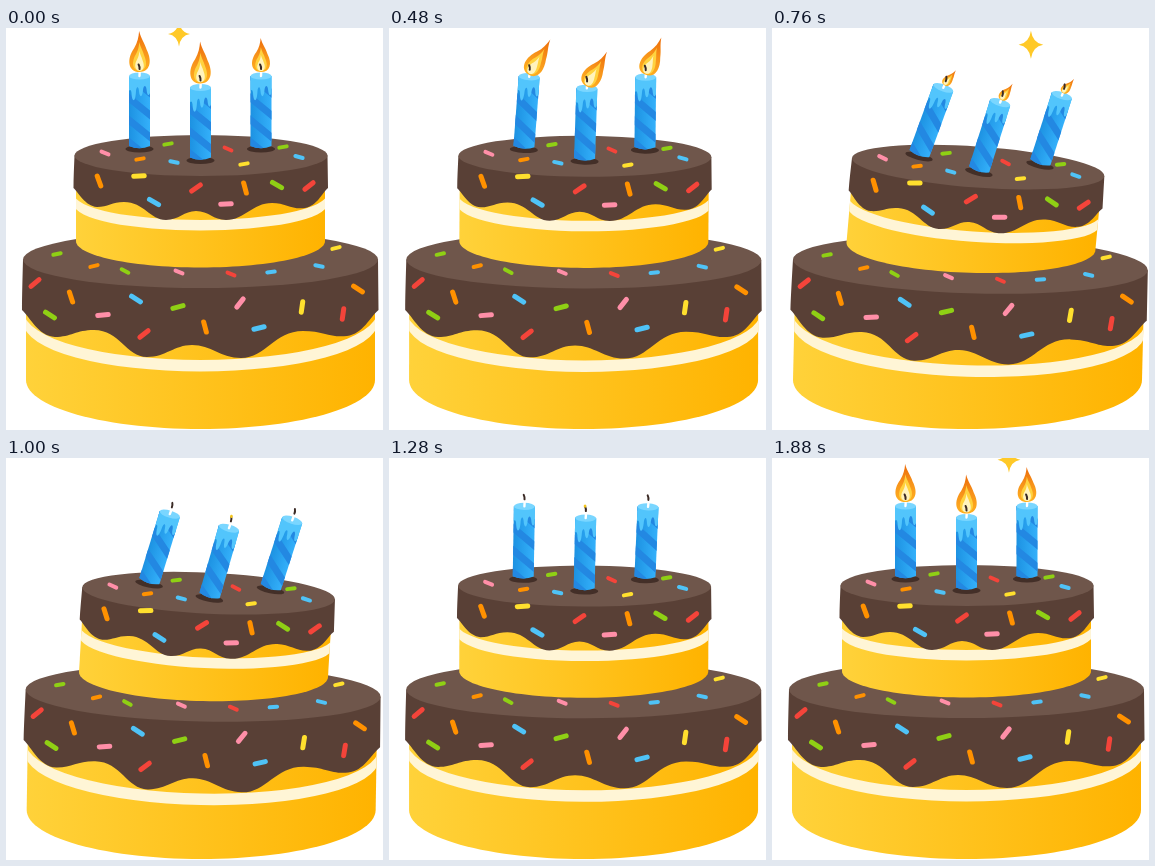
Write an HTML page with a canvas that moves like this. It is 377 px wide and 402 px high and loops after 1.92 s.

```html
<!DOCTYPE html>
<html lang="en">
<head>
<meta charset="utf-8">
<title>Birthday cake</title>
<style>
  html, body { margin: 0; width: 100%; height: 100%; overflow: hidden; background: #fff; }
  canvas { display: block; width: 377px; height: 402px; }
</style>
</head>
<body>
<canvas id="stage"></canvas>
<script>
const W = 377, H = 402, LOOP = 1920, STEP = 40;
const canvas = document.getElementById('stage');
const ctx = canvas.getContext('2d');
const dpr = window.devicePixelRatio || 1;
canvas.width = W * dpr;
canvas.height = H * dpr;

const RAD = Math.PI / 180;
const C = {
  side: '#594036', face: '#6f564b', cream: '#fff5d6', shade: '#432f28',
  p: '#ff8fa8', o: '#ff9100', g: '#8fd014', b: '#4fc3f7', r: '#f4443a', y: '#ffe02e'
};

// Sprinkles: x, y, angle, colour
const lower = {
  cx: 194.5, rx: 174.5, pivot: [22, 362], lean: 1.75,
  face: [194.5, 231.5, 177.5, 28.5],
  bottom: [352, 49], stripe: [284, 48, 11.5],
  icing: new Path2D('M17 231.5 C16.5 250 16 268 16 282 C24 289 32 308 49 309 C65 309 70 302 88 302 ' +
    'C114 302 120 329 141 329 C160 329 168 317 186 317 C205 317 215 330 235 330 ' +
    'C260 330 268 303 297 303 C318 303 324 310 341 308 C357 306 364 289 372.5 282 L372 231.5 Z'),
  flat: [[51,226,-12,'g'], [88,238,-14,'o'], [119,243,28,'g'], [173,244,22,'p'],
    [225,246,22,'r'], [265,244,-6,'b'], [313,238,12,'b'], [330,220,-14,'y']],
  front: [[29,255,-40,'r'], [65,269,72,'o'], [44,287,32,'g'], [97,287,-5,'p'], [130,271,32,'b'],
    [138,306,-38,'r'], [172,279,-15,'g'], [199,299,75,'o'], [234,275,-52,'p'],
    [253,300,-14,'b'], [296,279,-82,'y'], [337,286,-82,'r'], [352,261,33,'o']]
};
const upper = {
  cx: 194.5, rx: 124.5, pivot: [38, 290], lean: 4.1,
  face: [195, 127.5, 126.5, 20.5],
  bottom: [213, 26.5], stripe: [166, 26, 10.5],
  icing: new Path2D('M68.5 127.5 C68 140 67.5 150 67.5 160 C73 165 79 178 91 179 C102 179 106 174 118 174 ' +
    'C138 174 144 192 160 192 C173 192 178 183 190 183 C203 183 207 192 220 192 ' +
    'C239 192 246 175 266 175 C280 175 286 182 299 180 C311 178 316 165 322 160 L321.5 127.5 Z'),
  flat: [[99,125,22,'p'], [134,131,-10,'o'], [162,116,-10,'g'], [168,134,12,'b'],
    [222,121,24,'r'], [238,136,-10,'y'], [277,119,-10,'g'], [293,129,15,'b']],
  front: [[93,153,70,'o'], [133,148,-4,'y'], [148,174,30,'b'], [190,160,-35,'r'],
    [220,176,-4,'p'], [239,160,75,'o'], [271,157,30,'g'], [303,158,-38,'r']]
};

// swing: lean start, lean end, return start, return end, degrees
// size and tilt: flame length and direction as [ms, value]
const candles = [
  { x: 133.5, y: 119, swing: [360, 760, 890, 1340, 20],
    size: [[0,41], [160,38], [320,42], [600,41], [760,19], [860,0], [1380,0], [1600,36], [1740,42], [1880,38], [1920,41]],
    tilt: [[0,0], [380,0], [580,65], [620,65], [780,38], [1200,0]] },
  { x: 194.5, y: 130.5, swing: [400, 800, 910, 1350, 18], ember: true,
    size: [[0,42], [160,38], [320,33], [600,45], [760,20], [880,0], [1420,0], [1640,37], [1760,35], [1880,39], [1920,42]],
    tilt: [[0,0], [380,0], [580,64], [620,64], [780,36], [1200,0]] },
  { x: 255, y: 119, swing: [440, 840, 900, 1390, 20],
    size: [[0,34], [160,39], [320,46], [600,37], [760,18], [860,0], [1400,0], [1620,38], [1740,41], [1880,35], [1920,34]],
    tilt: [[0,0], [400,0], [580,58], [620,58], [780,40], [1200,0]] }
];

// Stars: from, to, x, y at start, x drift, y drift per second, radius by time
const stars = [
  { from: 0, to: 440, x: 173, y: 6, vx: 16, vy: 97, r: [[0,12.5], [320,11.5], [440,0]] },
  { from: 640, to: 920, x: 257.5, y: 6, vx: 12, vy: 90, r: [[640,2], [760,14], [840,9], [920,0]] },
  { from: 1740, to: 1920, x: 235, y: -13, vx: 14, vy: 105, r: [[1740,13], [1920,13]] }
];

function ease(t, a, b) {
  const u = Math.min(1, Math.max(0, (t - a) / (b - a)));
  return u * u * (3 - 2 * u);
}

function along(keys, t) {
  for (let i = 1; i < keys.length; i++) {
    const [t0, v0] = keys[i - 1], [t1, v1] = keys[i];
    if (t <= t1) return v0 + (v1 - v0) * ease(t, t0, t1);
  }
  return keys[keys.length - 1][1];
}

function turn([px, py], deg, x, y) {
  const c = Math.cos(deg * RAD), s = Math.sin(deg * RAD);
  return [px + (x - px) * c - (y - py) * s, py + (x - px) * s + (y - py) * c];
}

function inFrame(x, y, deg, draw) {
  ctx.save();
  ctx.translate(x, y);
  ctx.rotate(deg * RAD);
  draw();
  ctx.restore();
}

function oval(x, y, rx, ry, fill) {
  ctx.beginPath();
  ctx.ellipse(x, y, rx, ry, 0, 0, 2 * Math.PI);
  ctx.fillStyle = fill;
  ctx.fill();
}

function sprinkle([x, y, deg, hue], len, width) {
  inFrame(x, y, deg, () => {
    ctx.beginPath();
    ctx.moveTo(-len / 2, 0);
    ctx.lineTo(len / 2, 0);
    ctx.lineWidth = width;
    ctx.lineCap = 'round';
    ctx.strokeStyle = C[hue];
    ctx.stroke();
  });
}

// The sponge joins a leaning top edge to the edge it stands on.
function tier(part, amount, foot) {
  const { cx, rx, pivot, face, bottom, stripe } = part;
  const deg = part.lean * amount;
  const top = face[1] + 22;
  const body = new Path2D();
  body.moveTo(...turn(pivot, deg, cx + rx, top));
  for (let i = 0; i <= 60; i++) {
    const a = Math.PI * i / 60;
    body.lineTo(...foot(cx + rx * Math.cos(a), bottom[0] + bottom[1] * Math.sin(a)));
  }
  body.lineTo(...turn(pivot, deg, cx - rx, top));
  body.closePath();

  const gold = ctx.createLinearGradient(cx - rx, 0, cx + rx, 0);
  gold.addColorStop(0, '#ffd23a');
  gold.addColorStop(1, '#ffb300');
  ctx.fillStyle = gold;
  ctx.fill(body);

  ctx.save();
  ctx.clip(body);
  ctx.translate(...pivot);
  ctx.rotate(deg * RAD);
  ctx.translate(-pivot[0], -pivot[1]);
  const [sy, sr, thick] = stripe;
  ctx.beginPath();
  ctx.ellipse(cx, sy, rx + 2, sr, 0, 0, Math.PI);
  ctx.ellipse(cx, sy + thick, rx + 2, sr, 0, Math.PI, 0, true);
  ctx.closePath();
  ctx.fillStyle = C.cream;
  ctx.fill();
  ctx.restore();

  inFrame(...pivot, deg, () => {
    ctx.translate(-pivot[0], -pivot[1]);
    ctx.fillStyle = C.side;
    ctx.fill(part.icing);
    oval(...face, C.face);
    part.flat.forEach(s => sprinkle(s, 7.5, 4));
    part.front.forEach(s => sprinkle(s, 10.5, 5));
  });
}

const wax = new Path2D('M-10.5 -71 L10.5 -71 L10.5 -54 C9 -50 7.5 -52 7 -58 C6 -63 4 -61 3.5 -57 ' +
  'C3 -49 0 -49 -.5 -56 C-1 -61 -3 -61 -3.5 -56 C-4 -44 -7.5 -44 -8 -54 C-8.5 -58 -10 -57 -10.5 -56 Z');

function candleBody() {
  const shape = new Path2D('M-10.5 -71 L10.5 -71 L10.5 -1 Q0 3.5 -10.5 -1 Z');
  const blue = ctx.createLinearGradient(-10.5, 0, 10.5, 0);
  blue.addColorStop(0, '#1d92e2');
  blue.addColorStop(1, '#34b0fa');
  ctx.fillStyle = blue;
  ctx.fill(shape);
  ctx.save();
  ctx.clip(shape);
  ctx.fillStyle = '#2388e2';
  for (let y = -66; y < 20; y += 22) {
    ctx.beginPath();
    ctx.moveTo(-11, y - 10);
    ctx.lineTo(11, y + 8);
    ctx.lineTo(11, y + 17);
    ctx.lineTo(-11, y - 1);
    ctx.fill();
  }
  ctx.restore();
  ctx.fillStyle = '#52c5fc';
  ctx.fill(wax);
  oval(0, -71, 10.5, 3.6, '#7ad6ff');
}

function strand(x0, y0, x1, y1, hue, width) {
  ctx.beginPath();
  ctx.moveTo(x0, y0);
  ctx.quadraticCurveTo(.3, (y0 + y1) / 2, x1, y1);
  ctx.lineWidth = width;
  ctx.lineCap = 'round';
  ctx.strokeStyle = hue;
  ctx.stroke();
}

function tongue(w, h, fill) {
  ctx.beginPath();
  ctx.moveTo(0, 0);
  ctx.bezierCurveTo(-w * .6, 0, -w * .64, -h * .33, -w * .27, -h * .58);
  ctx.bezierCurveTo(-w * .1, -h * .72, -w * .04, -h * .85, -w * .02, -h);
  ctx.bezierCurveTo(w * .08, -h * .8, w * .25, -h * .72, w * .36, -h * .54);
  ctx.bezierCurveTo(w * .66, -h * .24, w * .5, 0, 0, 0);
  ctx.fillStyle = fill;
  ctx.fill();
}

function flame(len, blown) {
  if (len < 1) return;
  const w = Math.min(20, len * .52) * (1 - .15 * blown);
  const hot = ctx.createLinearGradient(0, 0, 0, -len);
  hot.addColorStop(0, '#ffb020');
  hot.addColorStop(.5, '#f7931a');
  hot.addColorStop(1, '#ec6a08');
  ctx.translate(0, len * .1 * blown);
  tongue(w, len, hot);
  ctx.translate(0, -len * .03);
  tongue(w * .64, len * .7, '#ffd23f');
  tongue(w * .42, len * .48, '#fff3bd');
}

// Candles swing about a point sunk below the icing.
const SUNK = 6;

function candle(c, t, amount) {
  const [a, b, back, end, deg] = c.swing;
  const angle = deg * (ease(t, a, b) - ease(t, back, end));
  const root = turn(upper.pivot, upper.lean * amount, c.x, c.y + SUNK);
  const base = turn(root, angle, root[0], root[1] - SUNK);
  const len = along(c.size, t), tilt = along(c.tilt, t);
  inFrame(base[0], base[1] + 2, upper.lean * amount + angle / 2, () => oval(0, 0, 14, 3.5, C.shade));
  inFrame(...base, angle, () => {
    candleBody();
    strand(0, -71, 0, -77, '#fff', 2.4);
  });
  inFrame(...turn(base, angle, base[0], base[1] - 75), tilt, () => flame(len, tilt / 65));
  inFrame(...base, angle, () => {
    strand(0, -78, -.9, -82.5, '#3a2a25', 2);
    if (c.ember && len < 1) oval(-.9, -83, 1.4, 1.6, '#f5c61c');
  });
}

function star(s, t) {
  if (t < s.from || t >= s.to) return;
  const age = (t - s.from) / 1000, r = along(s.r, t), w = r * .88, k = r * .12;
  inFrame(s.x + s.vx * age, s.y + s.vy * age, 0, () => {
    ctx.beginPath();
    ctx.moveTo(0, -r);
    ctx.quadraticCurveTo(k, -k, w, 0);
    ctx.quadraticCurveTo(k, k, 0, r);
    ctx.quadraticCurveTo(-k, k, -w, 0);
    ctx.quadraticCurveTo(-k, -k, 0, -r);
    ctx.fillStyle = '#ffc928';
    ctx.fill();
  });
}

function draw(t) {
  const amount = ease(t, 420, 775) - ease(t, 775, 1360);
  ctx.setTransform(dpr, 0, 0, dpr, 0, 0);
  ctx.fillStyle = '#fff';
  ctx.fillRect(0, 0, W, H);
  stars.forEach(s => star(s, t));
  tier(lower, amount, (x, y) => [x + amount, y]);
  tier(upper, amount, (x, y) => turn(lower.pivot, lower.lean * amount, x, y));
  [0, 2, 1].forEach(i => candle(candles[i], t, amount));
}

const start = performance.now();
function tick() {
  const t = (performance.now() - start) % LOOP;
  draw(Math.floor(t / STEP) * STEP);
  requestAnimationFrame(tick);
}
tick();
</script>
</body>
</html>
```
